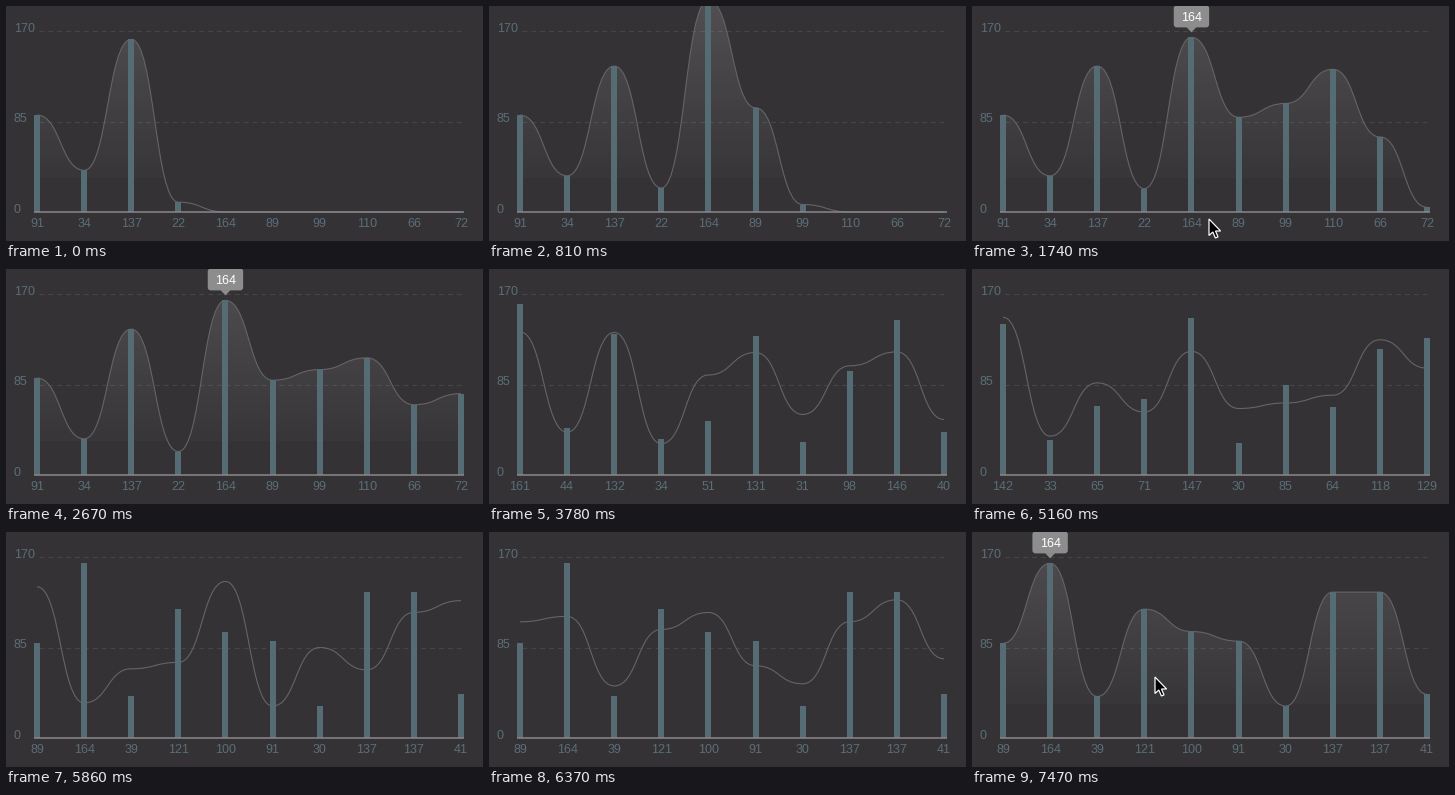
A matplotlib script for the animation above (8 s loop, 477 by 235 pixels).

```python
import numpy as np
import matplotlib.pyplot as plt
from matplotlib.animation import FuncAnimation
from matplotlib.patches import FancyBboxPatch, PathPatch, Polygon, Rectangle
from matplotlib.path import Path

W, H, DPI = 477, 235, 64  # a power of two keeps the pixel size exact
LOOP, STEP = 8000, 40
PX = 72 / DPI

BG, STEEL, LABEL = "#343235", "#566c75", "#5a6e78"
GRID, AXIS, CURVE, TIP = "#474548", "#8b898b", "#656466", "#8e8d8e"

BASE, UNIT = 206, 181 / 170
XS = np.linspace(31, 455, 10)
MID = (XS[1:] + XS[:-1]) / 2

SETS = np.array([
    [91, 34, 137, 22, 164, 89, 99, 110, 66, 72],
    [161, 44, 132, 34, 51, 131, 31, 98, 146, 40],
    [142, 33, 65, 71, 147, 30, 85, 64, 118, 129],
    [89, 164, 39, 121, 100, 91, 30, 137, 137, 41],
])
SWAP = [0, 3380, 4620, 5860]      # bars and labels jump to the next set
GLIDE = [0, 3353, 4724, 5953]     # curve starts to follow
SETTLED = [1500, 4190, 5460, 6670]  # tooltip appears
GLIDE_MS = 740

# Springy growth of one bar: time in ms, share of the final height
GROW_T = [0, 90, 190, 290, 390, 500, 620, 730, 810, 900, 1000, 1100]
GROW_R = [0, .08, .33, .78, 1.1, 1.17, 1.25, 1.2, 1.17, 1.09, 1.03, 1]
STAGGER, LEAD = 310, 1120
GAIN = np.array([1] * 9 + [1.7])

CURSORS = [(1600, 2060, 237, 213), (7350, 7470, 183, 145)]
ARROW = np.array([(0, 0), (0, 16.5), (3.8, 13), (6.4, 19), (9, 17.9),
                  (6.5, 12), (11.6, 12)])


def to_y(values):
    return BASE - np.asarray(values) * UNIT


def grown(t):
    r = np.interp(t + LEAD - STAGGER * np.arange(10), GROW_T, GROW_R)
    return SETS[0] * np.where(r > 1, 1 + (r - 1) * GAIN, r)


def curve_path(values, closed=False):
    ys = to_y(values)
    pts, codes = [(XS[0], ys[0])], [Path.MOVETO]
    for i, m in enumerate(MID):
        pts += [(m, ys[i]), (m, ys[i + 1]), (XS[i + 1], ys[i + 1])]
        codes += [Path.CURVE4] * 3
    if closed:
        pts += [(XS[-1], BASE), (XS[0], BASE), pts[0]]
        codes += [Path.LINETO, Path.LINETO, Path.CLOSEPOLY]
    return Path(pts, codes)


def state(t):
    """Return set index, bar values, curve values and whether the area shows."""
    n = sum(t >= s for s in SWAP) - 1
    if n == 0:
        bars = grown(t)
        return n, bars, bars, True
    u = np.clip((t - GLIDE[n]) / GLIDE_MS, 0, 1)
    p = (1 - np.cos(np.pi * u)) / 2
    line = SETS[n - 1] + (SETS[n] - SETS[n - 1]) * p
    return n, SETS[n], line, t >= SETTLED[n]


fig = plt.figure(figsize=(W / DPI, H / DPI), dpi=DPI, facecolor=BG)
ax = fig.add_axes([0, 0, 1, 1])
ax.set_xlim(0, W)
ax.set_ylim(H, 0)
ax.axis("off")


def text(x, y, s, color=LABEL, ha="center", z=6):
    return ax.text(x, y, s, color=color, ha=ha, va="baseline", zorder=z,
                   family="Liberation Sans", size=12.5 * PX)


for value in (170, 85, 0):
    y = float(to_y(value))
    text(8, y + 0.6, str(value), ha="left")
    if value:
        ax.plot([33, 455], [y, y], color=GRID, lw=1.2 * PX, zorder=1,
                dashes=(4, 3.4), dash_capstyle="butt")
ax.plot([28, 458], [BASE, BASE], color=AXIS, lw=1.5 * PX, zorder=5,
        solid_capstyle="butt")

# White veil that fades downwards and stops a little above the axis
shade = np.ones((H, 1, 4))
rows = np.arange(H)
shade[:, 0, 3] = np.where(rows < 172, 0.14 - 0.12 * rows / 172, 0)
area = ax.imshow(shade, extent=(0, W, H, 0), aspect="auto", zorder=2,
                 interpolation="nearest")

line = ax.add_patch(PathPatch(curve_path(SETS[0]), fc="none", ec=CURVE,
                              lw=1.1 * PX, zorder=3))
bars = [ax.add_patch(Rectangle((x - 3, BASE), 6, 0, fc=STEEL, lw=0, zorder=4))
        for x in XS]
labels = [text(x, 221.3, "") for x in XS]

tip_box = ax.add_patch(FancyBboxPatch((0, 0), 1, 1, fc=TIP, lw=0, zorder=7,
                                      boxstyle="round,pad=0,rounding_size=3"))
tip_arrow = ax.add_patch(Polygon([(0, 0)] * 3, fc=TIP, lw=0, zorder=7))
tip_text = text(0, 0, "", color="white", z=8)
cursor = ax.add_patch(Polygon(ARROW, fc="black", ec="white", lw=1.2 * PX,
                              joinstyle="miter", zorder=9))


def place_tip(n, visible):
    for part in (tip_box, tip_arrow, tip_text):
        part.set_visible(visible)
    i = int(np.argmax(SETS[n]))
    x, y = XS[i], float(to_y(SETS[n][i]))
    tip_box.set_bounds(x - 17.7, y - 32, 35.4, 22)
    tip_arrow.set_xy([(x - 5, y - 10.3), (x + 5, y - 10.3), (x, y - 5)])
    tip_text.set_position((x, y - 16.2))
    tip_text.set_text(str(SETS[n][i]))


def draw(frame):
    t = frame * STEP + STEP / 2
    n, heights, values, filled = state(t)

    for bar, label, h, v in zip(bars, labels, heights, SETS[n]):
        bar.set_y(BASE - h * UNIT)
        bar.set_height(h * UNIT)
        label.set_text(str(v))

    line.set_path(curve_path(values))
    area.set_visible(filled)
    area.set_clip_path(curve_path(values, closed=True), ax.transData)
    place_tip(n, t >= SETTLED[n])

    cursor.set_visible(False)
    for start, end, x, y in CURSORS:
        if start <= t < end:
            cursor.set_xy(ARROW + (x, y))
            cursor.set_visible(True)
    return []


anim = FuncAnimation(fig, draw, frames=LOOP // STEP, interval=STEP,
                     init_func=lambda: [], repeat=True, repeat_delay=0)
plt.show()
```
